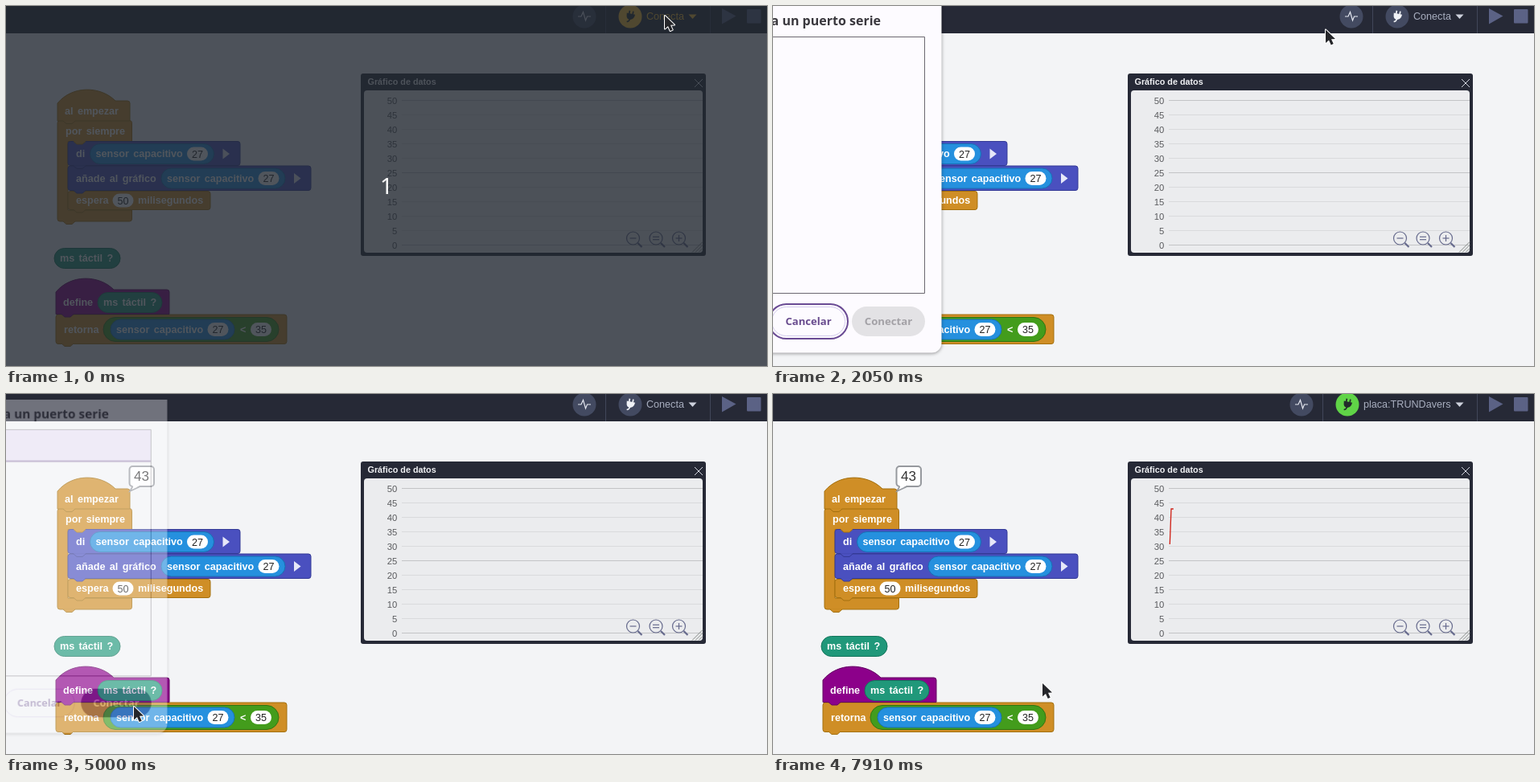
An HTML page with a canvas for the animation above (8 s loop, 946 px wide and 448 px high).

```html
<!DOCTYPE html>
<html lang="es">
<head>
<meta charset="utf-8">
<style>
html, body { margin: 0; width: 946px; height: 448px; overflow: hidden; background: #f3f4f6; }
canvas { display: block; }
</style>
</head>
<body>
<canvas id="stage" width="946" height="448"></canvas>
<script>
const LOOP = 8000;
const ctx = document.getElementById('stage').getContext('2d');
const SANS = '"Liberation Sans", Arial, sans-serif';
const UI = '"Noto Sans", "Open Sans", sans-serif';
const C = {
  dark: '#262936', slate: '#434a61', idle: '#5b6285', label: '#a9afc0', yellow: '#ffc42e',
  orange: '#cf8e26', orangeEdge: '#a4700f', violet: '#4a50bf', violetEdge: '#343a96',
  sky: '#2590de', skyEdge: '#1670b4', green: '#439c1c', greenEdge: '#2f7510',
  teal: '#20987a', tealEdge: '#13745b', purple: '#8c008a', purpleEdge: '#620061'
};

// Stepped progress: n equal steps, the first at t0 and the last at t1.
function steps(t, t0, t1, n) {
  const k = Math.floor((t - t0) / (t1 - t0) * (n - 1) + 1e-6) + 1;
  return Math.min(Math.max(k, 0), n) / n;
}

function text(g, str, x, y, font, color, align = 'left', spacing = 0) {
  g.font = font;
  g.fillStyle = color;
  g.textAlign = align;
  g.wordSpacing = spacing + 'px';
  g.fillText(str, x, y);
}

function box(g, x, y, w, h, r, fill, edge, width = 1) {
  g.beginPath();
  g.roundRect(x, y, w, h, r);
  if (fill) { g.fillStyle = fill; g.fill(); }
  if (edge) { g.strokeStyle = edge; g.lineWidth = width; g.stroke(); }
}

function lines(g, points, color, width = 1) {
  g.beginPath();
  points.forEach(([x, y]) => g.lineTo(x, y));
  g.strokeStyle = color;
  g.lineWidth = width;
  g.stroke();
}

function polygon(g, points, color) {
  g.beginPath();
  points.forEach(([x, y]) => g.lineTo(x, y));
  g.fillStyle = color;
  g.fill();
}

function disc(x, y, r, color) {
  ctx.beginPath();
  ctx.arc(x, y, r, 0, 7);
  ctx.fillStyle = color;
  ctx.fill();
}

// ---- Blocks ----
const word = (str, x, y) => text(ctx, str, x, y, `bold 12.6px ${SANS}`, '#fff', 'left', 1.9);
const pill = (x, y, w, h, fill, edge) => box(ctx, x + .5, y + .5, w - 1, h - 1, h / 2, fill, edge);
const block = (x, y, w, h, fill, edge) => box(ctx, x + .5, y + .5, w - 1, h, 3, fill, edge);

function number(n, x, y) {
  box(ctx, x, y, 26, 17, 8.5, '#fff');
  text(ctx, n, x + 13, y + 13, `12.6px ${SANS}`, '#222', 'center');
}

function tab(x, y, fill, edge) {
  const path = [[x, y], [x + 4, y + 3.5], [x + 11, y + 3.5], [x + 15, y]];
  polygon(ctx, [[x, y - .8], ...path, [x + 15, y - .8]], fill);
  lines(ctx, path, edge);
}

function hat(x, y, w, h, fill, edge) {
  const r = x + w, b = y + h;
  ctx.beginPath();
  ctx.moveTo(x, b);
  ctx.lineTo(x, y + 3);
  ctx.bezierCurveTo(x + 18, y - 19, x + 53, y - 19, x + 72, y);
  ctx.lineTo(r - 3, y);
  ctx.quadraticCurveTo(r, y, r, y + 3);
  ctx.lineTo(r, b);
  ctx.closePath();
  ctx.fillStyle = fill;
  ctx.fill();
  ctx.strokeStyle = edge;
  ctx.lineWidth = 1;
  ctx.stroke();
}

function sensor(x, y) {
  pill(x, y, 155, 26, C.sky, C.skyEdge);
  word('sensor capacitivo', x + 7.5, y + 17.3);
  number('27', x + 121, y + 4.5);
}

function touch(x, y, w) {
  pill(x, y, w, 26, C.teal, C.tealEdge);
  word('ms táctil ?', x + 7.5, y + 17);
}

const arrow = (x, y) => polygon(ctx, [[x, y], [x + 8.5, y + 6.5], [x, y + 13]], '#e6e8f8');

function foreverLoop() {
  ctx.beginPath();
  ctx.roundRect(64, 142.5, 92.5, 125.5, 3);
  ctx.fillStyle = C.orange;
  ctx.fill();
  ctx.strokeStyle = C.orangeEdge;
  ctx.lineWidth = 1;
  ctx.stroke();
  ctx.fillStyle = '#f3f4f6';
  ctx.fillRect(77, 168.5, 82, 85.5);
  lines(ctx, [[156.5, 168.5], [77, 168.5], [77, 254], [156.5, 254]], C.orangeEdge);
}

function blocks() {
  const O = [C.orange, C.orangeEdge], V = [C.violet, C.violetEdge];
  foreverLoop();
  hat(64, 118, 90, 25, ...O);
  block(76.5, 230, 178, 23, ...O);
  block(76.5, 198.5, 303, 30.5, ...V);
  block(76.5, 168, 215, 30, ...V);
  tab(71, 143, ...O);
  tab(84, 168.5, ...O);
  tab(84, 199, ...V);
  tab(84, 229.5, ...V);
  tab(84, 253.5, ...O);
  tab(71, 268, ...O);
  word('al empezar', 73, 135);
  word('por siempre', 74, 159.5);
  word('di', 87, 188.3);
  sensor(104, 171);
  arrow(269.5, 177.5);
  word('añade al gráfico', 87, 218.8);
  sensor(192.5, 201.5);
  arrow(358, 208);
  word('espera', 87, 246);
  number('50', 132.5, 233.5);
  word('milisegundos', 164, 246);

  touch(59.5, 301, 83);

  block(61.5, 383.5, 288, 36.5, ...O);
  hat(62, 353, 141, 30.5, C.purple, C.purpleEdge);
  tab(69, 383.5, C.purple, C.purpleEdge);
  tab(69, 420, ...O);
  word('define', 71, 373.3);
  touch(113.5, 356, 81);
  word('retorna', 72, 407);
  pill(120.5, 387, 219, 31, C.green, C.greenEdge);
  sensor(129.5, 389.5);
  word('<', 291, 407);
  number('35', 304, 394);
}

function balloon() {
  const edge = '#96999e';
  box(ctx, 153.5, 90, 30.5, 25, 4, '#fff', edge, 2);
  polygon(ctx, [[158, 113.5], [154, 121], [167, 113.5]], '#fff');
  lines(ctx, [[157.5, 115], [154, 121], [167, 115]], edge, 1.6);
  text(ctx, '43', 168.5, 108, `17px ${SANS}`, '#333', 'center');
}

// ---- Header ----
function plug(x, y, color) {
  ctx.save();
  ctx.translate(x, y);
  ctx.rotate(.2);
  ctx.strokeStyle = ctx.fillStyle = color;
  ctx.lineWidth = 1.7;
  ctx.beginPath();
  ctx.moveTo(-2, -7); ctx.lineTo(-2, -3);
  ctx.moveTo(2.5, -7); ctx.lineTo(2.5, -3);
  ctx.moveTo(0, 3); ctx.quadraticCurveTo(0, 7, -3, 7);
  ctx.stroke();
  ctx.beginPath();
  ctx.moveTo(-5, -3.5); ctx.lineTo(5.5, -3.5); ctx.lineTo(5, 0);
  ctx.quadraticCurveTo(3.5, 4, 0, 4);
  ctx.quadraticCurveTo(-4, 4, -4.5, 0);
  ctx.fill();
  ctx.restore();
}

function header(hover, online) {
  const dx = online ? -62 : 0;
  ctx.fillStyle = C.dark;
  ctx.fillRect(0, 0, 946, 34);
  disc(719 + dx, 13, 14.5, C.slate);
  const pulse = [[-8, 0], [-4, 0], [-1.5, -5.5], [1.5, 5], [3.5, 0], [8, 0]];
  lines(ctx, pulse.map(([x, y]) => [719 + dx + x, 13 + y]), '#e4e7f0', 1.2);
  ctx.fillStyle = '#414659';
  ctx.fillRect(745 + dx, 0, 1, 34);
  ctx.fillRect(875, 0, 1, 34);
  disc(776 + dx, 13, 14.5, online ? '#60d447' : hover ? C.yellow : C.slate);
  plug(776 + dx, 13, online || hover ? '#232a2b' : '#f0f2f6');
  const color = hover ? C.yellow : C.label;
  text(ctx, online ? 'placa:TRUNDavers' : 'Conecta', 796 + dx, 17, `12.6px ${SANS}`, color);
  polygon(ctx, [[848.5, 10.5], [858.5, 10.5], [853.5, 16]], hover ? C.yellow : '#cdd1dc');
  polygon(ctx, [[890, 3], [907.5, 12.5], [890, 22.5]], C.idle);
  box(ctx, 921, 4, 17.5, 17.5, 1, C.idle);
}

function menu(active) {
  box(ctx, 801.5, 10.5, 141, 63, 2, '#f3f4f6', '#9aa0b3');
  if (active) box(ctx, 803, 12, 138, 30, 1, C.slate);
  text(ctx, 'conecta (USB)', 812, 31, `12.6px ${SANS}`, active ? '#fff' : C.dark);
  text(ctx, 'conecta (BLE)', 812, 62, `12.6px ${SANS}`, C.dark);
}

// ---- Data graph ----
function magnifier(x, sign) {
  const color = '#666a8d', y = 289;
  ctx.beginPath();
  ctx.arc(x, y, 8, 0, 7);
  ctx.strokeStyle = color;
  ctx.lineWidth = 1.2;
  ctx.stroke();
  lines(ctx, [[x + 6, y + 6], [x + 11, y + 11]], color, 2.2);
  const bar = dy => lines(ctx, [[x - 4, y + dy], [x + 4, y + dy]], color, 1.2);
  if (sign === '=') { bar(-1.7); bar(1.7); } else bar(0);
  if (sign === '+') lines(ctx, [[x, y - 4], [x, y + 4]], color, 1.2);
}

function graph(plotted) {
  box(ctx, 441, 84, 429, 227, 3, C.dark);
  text(ctx, 'Gráfico de datos', 449.5, 98, `bold 10.8px ${SANS}`, '#f0f1f4');
  lines(ctx, [[856, 91], [866, 101]], '#d5d8e2');
  lines(ctx, [[866, 91], [856, 101]], '#d5d8e2');
  box(ctx, 445, 105, 421, 202, 4, '#ebecee');
  for (let v = 0; v <= 50; v += 5) {
    const y = 298 - v * 3.6;
    ctx.fillStyle = v % 25 ? '#d9dadc' : '#c3c4c6';
    ctx.fillRect(492, Math.round(y) - 1, 374, 1);
    text(ctx, v, 486.3, y + 4, `11.3px ${SANS}`, '#5a5b5e', 'right');
  }
  magnifier(779.5, '-');
  magnifier(808, '=');
  magnifier(836.5, '+');
  for (const d of [5, 9, 13]) lines(ctx, [[866 - d, 306.5], [866, 306.5 - d]], '#858a86');
  if (plotted) lines(ctx, [[493.3, 187], [495, 143], [497.8, 143]], '#cf1f14', 1.3);
}

// ---- Serial port dialog, composed apart so it can fade as one layer ----
const layer = document.createElement('canvas');
layer.width = 300;
layer.height = 500;
const dlg = layer.getContext('2d');
const PAD = 60;

function composeDialog(selected, pressed) {
  dlg.setTransform(1, 0, 0, 1, 0, 0);
  dlg.clearRect(0, 0, 300, 500);
  dlg.translate(PAD, 0);
  dlg.shadowColor = 'rgba(0,0,0,.4)';
  dlg.shadowBlur = 4;
  dlg.shadowOffsetY = 1;
  box(dlg, -258, -58, 467.5, 489.5, 12, '#fdfbff');
  dlg.shadowColor = 'transparent';
  text(dlg, 'a un puerto serie', 134, 24, `600 16px ${UI}`, '#3a383e', 'right');
  if (selected) {
    dlg.fillStyle = '#e9dafa';
    dlg.fillRect(-60, 39, 249, 40);
    dlg.fillStyle = '#68488c';
    dlg.fillRect(-60, 78.5, 249, 2);
  }
  box(dlg, -237.5, 38.5, 426, 319, 0, null, '#6c6870');
  box(dlg, -1.5, 374.5, 91, 36, 18, '#fdfbff', '#d3caec');
  if (!selected) box(dlg, -5, 371, 98, 43, 21.5, null, '#6a4b94', 2);
  text(dlg, 'Cancelar', 44, 397, `600 13.1px ${UI}`, '#684b8e', 'center');
  box(dlg, 98, 374, 91, 37, 18.5, !selected ? '#e3e2e5' : pressed ? '#5f4580' : '#7d629d');
  text(dlg, 'Conectar', 143.5, 397, `600 13.2px ${UI}`, selected ? '#fff' : '#a3a1a6', 'center');
}

function dialog(t) {
  if (t < 1910 || t >= 5060) return;
  const alpha = t < 4800
    ? Math.min(1, .2 + Math.floor((t - 1910) / 45) * .28)
    : Math.min(1, Math.max(0, 1 - Math.floor((t - 4910) / 45) * .325));
  const scale = .94 + .06 * alpha, cx = -24, cy = 187;
  composeDialog(t >= 3770, t >= 4730);
  ctx.save();
  ctx.globalAlpha = alpha;
  ctx.translate(cx, cy);
  ctx.scale(scale, scale);
  ctx.drawImage(layer, -PAD - cx, -cy);
  ctx.restore();
}

// ---- Pointer: [start, end, steps, x, y] of each move ----
const MOVES = [
  [1360, 1450, 3, 831, 22], [1950, 2640, 15, 111, 59], [2730, 2820, 3, 68, 59],
  [4090, 4100, 1, 34, 221], [4140, 4550, 10, 159, 389], [5450, 6230, 16, 331, 377],
  [6270, 6280, 1, 336, 372], [7230, 7240, 1, 335, 371], [7410, 7420, 1, 336, 371],
  [7550, 7910, 6, 335, 360]
];

function pointer(t) {
  if (t >= 2860 && t < 4140) return;
  let x = 819, y = 12;
  for (const [t0, t1, n, tx, ty] of MOVES) {
    const p = n === 1 ? +(t >= t0) : steps(t, t0, t1, n);
    x += (tx - x) * p;
    y += (ty - y) * p;
  }
  ctx.save();
  ctx.translate(x, y);
  ctx.beginPath();
  [[0, 0], [0, 16.5], [4, 13], [6.7, 19], [9.7, 17.7], [7, 11.8], [12, 11.5]]
    .forEach(([px, py]) => ctx.lineTo(px, py));
  ctx.closePath();
  ctx.lineJoin = 'round';
  ctx.strokeStyle = '#fff';
  ctx.lineWidth = 2;
  ctx.stroke();
  ctx.fillStyle = '#25262a';
  ctx.fill();
  ctx.restore();
}

function countdown() {
  ctx.fillStyle = 'rgba(34,40,49,.79)';
  ctx.fillRect(0, 0, 946, 448);
  text(ctx, '1', 473, 234, `28px ${UI}`, '#fff', 'center');
}

function draw(t) {
  ctx.fillStyle = '#f3f4f6';
  ctx.fillRect(0, 0, 946, 448);
  header(t < 1360, t >= 5700);
  blocks();
  if (t >= 4900) balloon();
  graph(t >= 5045);
  if (t >= 910 && t < 1910) menu(t >= 1360);
  dialog(t);
  if (t < 50) countdown();
  pointer(t);
}

const start = performance.now();
function tick() {
  draw((performance.now() - start) % LOOP);
  requestAnimationFrame(tick);
}
tick();
</script>
</body>
</html>
```
